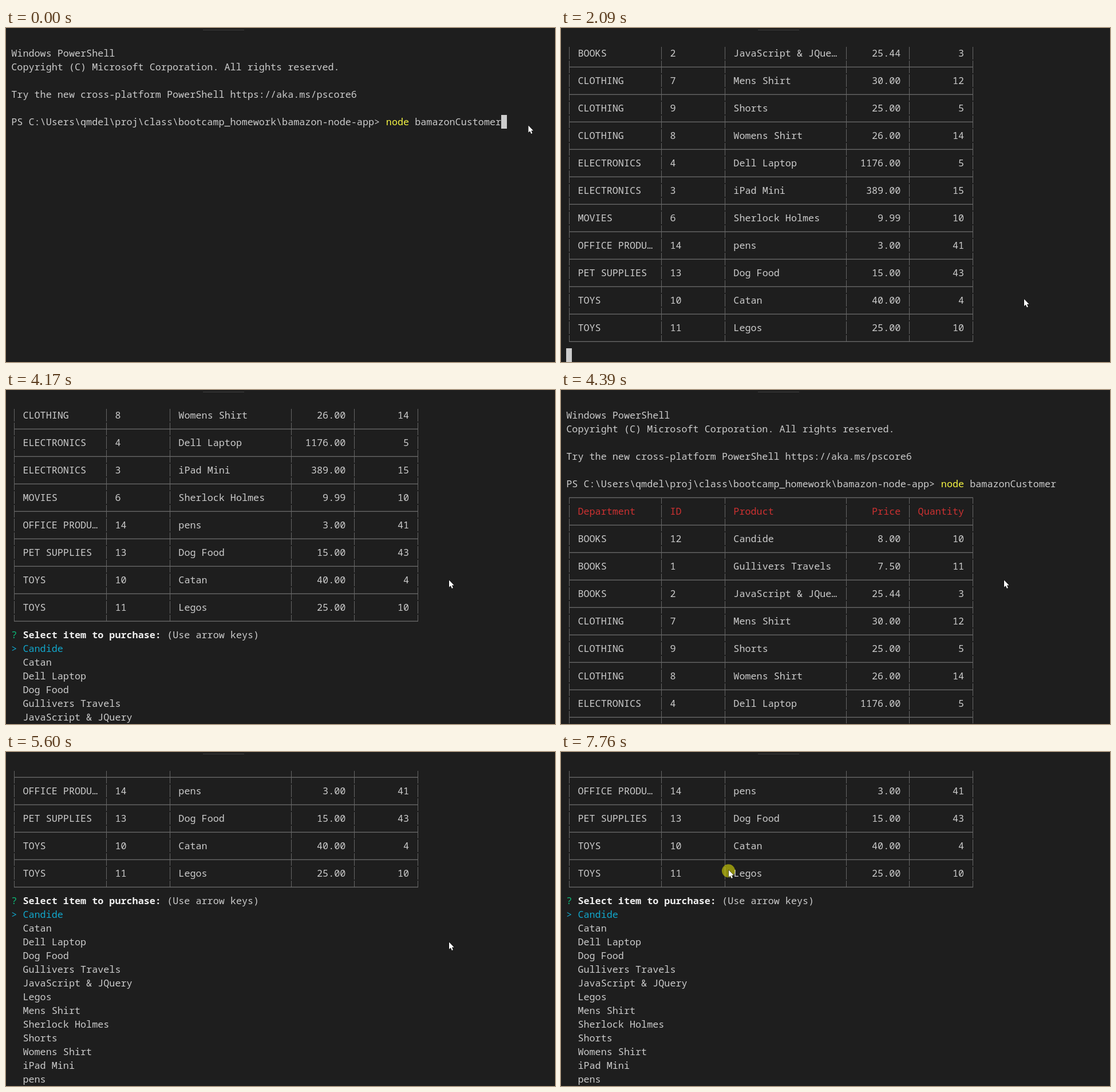
These frames come from a looping animation (959 by 584 pixels, 8 s). An HTML page with a canvas:

```html
<!DOCTYPE html>
<html lang="en">
<head>
<meta charset="utf-8">
<title>Terminal session</title>
<style>
  html, body { margin: 0; width: 100%; height: 100%; overflow: hidden; background: #1e1e1e; }
  canvas { display: block; width: 959px; height: 584px; }
</style>
</head>
<body>
<canvas id="stage" width="959" height="584"></canvas>
<script>
const ctx = document.getElementById('stage').getContext('2d');
const LOOP = 8000, LEFT = 9.3, TOP = 32, CELL = 10.07, LINE = 24, ROWS = 23;
const FONT = '16.78px "Noto Sans Mono", "DejaVu Sans Mono", monospace';
const FG = '#cccccc', GREY = '#666666', RED = '#cd3131', CYAN = '#11a8cd';
const EDGES = [0, 16, 27, 48, 59, 70];

const col = c => LEFT + c * CELL;
const plain = (text, color = FG) => [{ at: 0, text, color }];

// One table row: three left-aligned cells, then two right-aligned ones.
function row(cells, color = FG) {
  const parts = cells.map((text, i) => ({
    at: i < 3 ? EDGES[i] + 2 : EDGES[i + 1] - 1 - text.length, text, color
  }));
  parts.grid = 'row';
  return parts;
}
function rule(kind) {
  const parts = [];
  parts.grid = kind;
  return parts;
}

const stock = `BOOKS|12|Candide|8.00|10
BOOKS|1|Gullivers Travels|7.50|11
BOOKS|2|JavaScript & JQue…|25.44|3
CLOTHING|7|Mens Shirt|30.00|12
CLOTHING|9|Shorts|25.00|5
CLOTHING|8|Womens Shirt|26.00|14
ELECTRONICS|4|Dell Laptop|1176.00|5
ELECTRONICS|3|iPad Mini|389.00|15
MOVIES|6|Sherlock Holmes|9.99|10
OFFICE PRODU…|14|pens|3.00|41
PET SUPPLIES|13|Dog Food|15.00|43
TOYS|10|Catan|40.00|4
TOYS|11|Legos|25.00|10`.split('\n').map(s => s.split('|'));

const choices = ['Catan', 'Dell Laptop', 'Dog Food', 'Gullivers Travels', 'JavaScript & JQuery',
  'Legos', 'Mens Shirt', 'Sherlock Holmes', 'Shorts', 'Womens Shirt', 'iPad Mini', 'pens'];

const prompt = 'PS C:\\Users\\qmdel\\proj\\class\\bootcamp_homework\\bamazon-node-app> ';
const lines = [
  plain('Windows PowerShell'),
  plain('Copyright (C) Microsoft Corporation. All rights reserved.'),
  [],
  plain('Try the new cross-platform PowerShell https://aka.ms/pscore6'),
  [],
  [
    { at: 0, text: prompt, color: FG },
    { at: 65, text: 'node', color: '#f5f543' },
    { at: 70, text: 'bamazonCustomer', color: FG }
  ],
  rule('top'),
  row(['Department', 'ID', 'Product', 'Price', 'Quantity'], RED),
  ...stock.flatMap(cells => [rule('mid'), row(cells)]),
  rule('bottom'),
  [
    { at: 0, text: '?', color: '#0dbc79' },
    { at: 2, text: 'Select item to purchase:', color: '#f0f0f0', bold: true },
    { at: 27, text: '(Use arrow keys)', color: FG }
  ],
  plain('> Candide', CYAN),
  ...choices.map(name => [{ at: 2, text: name, color: FG }])
];

// [time, value] steps
const scroll = [[0, 0], [440, 13], [3840, 26], [4170, 19], [4280, 8], [4390, 0],
  [5270, 11], [5370, 21], [5600, 26]];
const printed = [[0, 6], [440, 35], [3840, lines.length]];
const caret = [[0, [85, 5]], [100, [0, 6]], [440, [0, 35]], [3840, null]];

function stepAt(list, t) {
  let value = list[0][1];
  for (const [time, v] of list) if (t >= time) value = v;
  return value;
}

// Pointer moves: start, step length, step count, end point, optional bend
const start = [912.5, 170.5];
const moves = [
  { t: 1420, dt: 110, n: 3, to: [834, 361] },
  { t: 1970, dt: 120, n: 2, to: [809, 474] },
  { t: 3080, dt: 105, n: 5, to: [774, 345] },
  { t: 3620, dt: 110, n: 2, to: [774, 332.5] },
  { t: 6020, dt: 108.5, n: 8, to: [551.5, 230.5], bend: [680, 568] },
  { t: 6910, dt: 107, n: 8, to: [293, 206.5] }
];

function pointerAt(t) {
  let from = start;
  for (const m of moves) {
    if (t < m.t) break;
    const k = Math.min(m.n, Math.floor((t - m.t) / m.dt + 0.001) + 1) / m.n;
    const p = k * k * (3 - 2 * k), q = 1 - p;
    const here = from.map((a, i) => {
      const c = m.bend ? m.bend[i] : (a + m.to[i]) / 2;
      return q * q * a + 2 * p * q * c + p * p * m.to[i];
    });
    if (k < 1) return here;
    from = m.to;
  }
  return from;
}

function drawGrid(kind, y) {
  const xs = EDGES.map(c => Math.round(col(c + 0.5)));
  const y0 = kind === 'top' ? y + 12 : y + 1;
  const y1 = kind === 'bottom' ? y + 12 : y + 23;
  ctx.fillStyle = GREY;
  for (const x of xs) ctx.fillRect(x, y0, 1, y1 - y0);
  if (kind !== 'row') ctx.fillRect(xs[0], y + 11.6, xs[5] - xs[0] + 1, 1.4);
}

function drawLine(parts, y) {
  if (parts.grid) drawGrid(parts.grid, y);
  for (const { at, text, color, bold } of parts) {
    ctx.font = (bold ? 'bold ' : '') + FONT;
    ctx.fillStyle = color;
    ctx.fillText(text, col(at), y + 18);
  }
}

const arrow = new Path2D('M0 0V12.2L2.8 9.7L4.9 14.4L6.9 13.5L4.9 9H8.7Z');
function drawPointer([x, y]) {
  ctx.save();
  ctx.translate(x, y);
  ctx.strokeStyle = '#000';
  ctx.lineWidth = 1;
  ctx.stroke(arrow);
  ctx.fillStyle = '#fff';
  ctx.fill(arrow);
  ctx.restore();
}

function draw(t) {
  const first = stepAt(scroll, t), end = stepAt(printed, t), block = stepAt(caret, t);
  ctx.fillStyle = '#1e1e1e';
  ctx.fillRect(0, 0, 959, 584);
  ctx.fillStyle = '#414141';
  ctx.fillRect(344, 3, 72, 1);

  for (let i = 0; i < ROWS && first + i < end; i++) {
    drawLine(lines[first + i], TOP + i * LINE);
  }
  if (block) {
    ctx.fillStyle = FG;
    ctx.fillRect(Math.round(col(block[0])), TOP + (block[1] - first) * LINE, 10, LINE);
  }
  if (t >= 7760) {
    ctx.fillStyle = 'rgba(255, 255, 0, 0.5)';
    ctx.beginPath();
    ctx.arc(292.5, 207.8, 11.5, 0, Math.PI * 2);
    ctx.fill();
  }
  drawPointer(pointerAt(t));
}

const begin = performance.now();
function tick() {
  draw((performance.now() - begin) % LOOP);
  requestAnimationFrame(tick);
}
draw(0);
requestAnimationFrame(tick);
</script>
</body>
</html>
```
